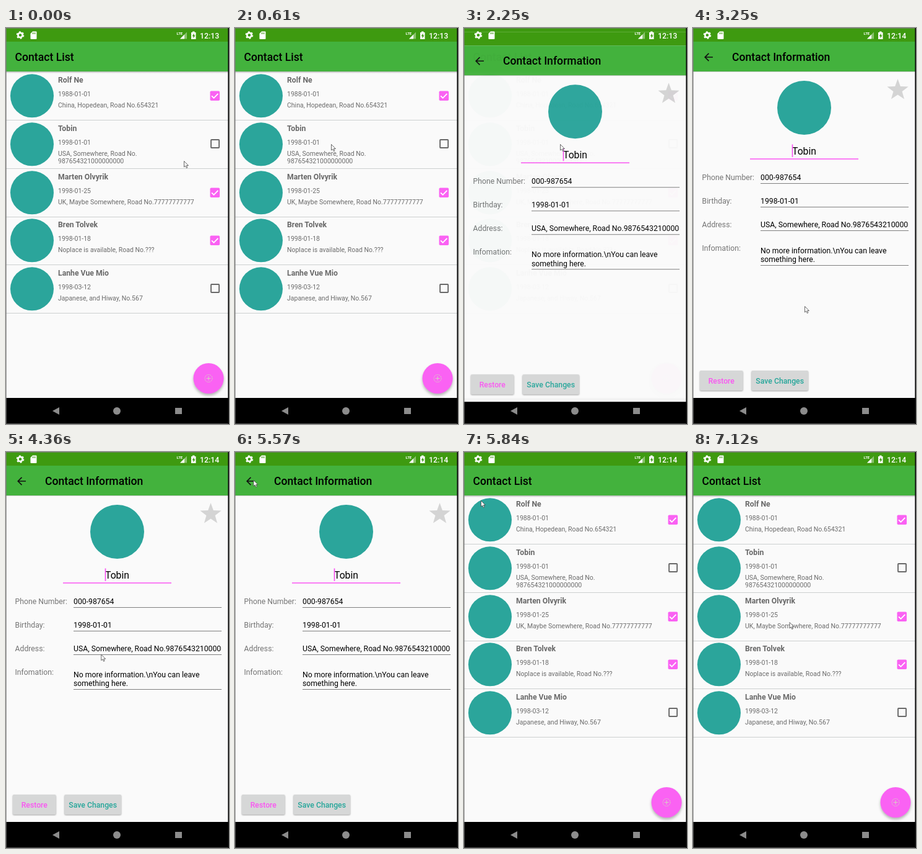
Write an HTML page that moves like this. It is 360x638 px and loops after 8 s.

```html
<!DOCTYPE html>
<html lang="en">
<head>
<meta charset="utf-8">
<title>Contact list</title>
<style>
  html, body { margin: 0; width: 100%; height: 100%; overflow: hidden; background: #000; }
  svg { display: block; width: 360px; height: 638px; font-family: Roboto, sans-serif; font-size: 12.26px; }
  .title { font-size: 17.6px; font-weight: 500; }
  .name { font-weight: 700; fill: #696969; }
  .small { font-size: 10.5px; fill: #6b6b6b; }
  .label { fill: #757575; }
  .btn { font-weight: 500; text-anchor: middle; }
  .shadow { filter: drop-shadow(0 1px 1px rgba(0, 0, 0, .35)); }
  .lift { filter: drop-shadow(0 3px 2px rgba(0, 0, 0, .28)); }
</style>
</head>
<body>
<svg viewBox="0 0 360 638">
  <defs>
    <linearGradient id="fade" x2="0" y2="1">
      <stop stop-color="#000" stop-opacity=".28"/>
      <stop offset="1" stop-color="#000" stop-opacity="0"/>
    </linearGradient>
    <clipPath id="field"><rect x="109" y="300" width="239" height="40"/></clipPath>
    <g id="window">
      <rect width="360" height="638" fill="#fafafa"/>
      <rect width="360" height="22" fill="#3e9a10"/>
      <rect y="22" width="360" height="48" fill="#43b23d"/>
      <rect y="596" width="360" height="42"/>
    </g>
  </defs>

  <g id="list">
    <use href="#window"/>
    <rect y="70" width="360" height="3" fill="url(#fade)"/>
    <text class="title" x="14.5" y="53">Contact List</text>
    <g id="rows"></g>
    <circle class="lift" cx="327" cy="564.5" r="24.5" fill="#fa62f3"/>
    <g fill="none" stroke="#d9cfc4">
      <circle cx="327" cy="564.5" r="6" stroke-dasharray="2 1"/>
      <path d="M323.5 564.5h7M327 561v7"/>
    </g>
  </g>

  <g id="detail">
    <use href="#window"/>
    <rect y="70" width="360" height="1.5" fill="url(#fade)"/>
    <path d="M32 47H19.5M25.5 40.8L19.3 47L25.5 53.2" fill="none" stroke="#111" stroke-width="1.7"/>
    <text class="title" x="63" y="53">Contact Information</text>
    <circle cx="179.5" cy="128.5" r="43.5" fill="#2ba59b"/>
    <polygon id="star" fill="#d4d4d4"/>
    <text x="179.5" y="204" font-size="15.77" text-anchor="middle">Tobin</text>
    <path d="M160.500 187.500v20.500M92 211h175" stroke="#fa55f2" stroke-width="1.7"/>
    <g id="fields"></g>
    <g class="shadow" fill="#d6d7d7">
      <rect x="11" y="552" width="69.5" height="32" rx="1.8"/>
      <rect x="94.5" y="552" width="91.5" height="32" rx="1.8"/>
    </g>
    <text class="btn" x="45.8" y="572.5" fill="#fa55f2">Restore</text>
    <text class="btn" x="140.2" y="572.5" fill="#26a69a">Save Changes</text>
  </g>

  <g id="system" fill="#fff">
    <circle cx="23" cy="11.5" r="3.6" fill="none" stroke="#fff" stroke-width="2.6"/>
    <circle cx="23" cy="11.5" r="5.4" fill="none" stroke="#fff" stroke-width="1.8" stroke-dasharray="2.83"/>
    <path d="M39.5 9L43 5.5h5.500q1 0 1 1v10.500q0 1-1 1h-8q-1 0-1-1z"/>
    <path d="M43 7.300v2.500M45 7.300v2.500M47 7.300v2.500" stroke="#3e9a10"/>
    <path d="M281 17.500L292 6.500v11z" opacity=".4"/>
    <path d="M281 17.500L288 10.500v7z"/>
    <text x="275.5" y="10.5" font-size="6" font-weight="700">LTE</text>
    <path d="M299 7h2V5.500h3.500V7h2v11H299z"/>
    <path d="M303.600 8.500l-3 4.700h1.900v3.300l3-4.800h-1.900z" fill="#3e9a10"/>
    <text id="clock" x="313" y="16.5" font-weight="500">12:13</text>
    <g fill="#8c8c8c">
      <path d="M75 617L86 611v12z"/>
      <circle cx="179" cy="617" r="6"/>
      <rect x="273" y="612" width="11" height="10"/>
    </g>
    <path d="M359 .5H.5V637.500H359" fill="none" stroke="#777" opacity=".7"/>
    <rect x="358.3" width="1.7" height="638" fill="#111"/>
  </g>

  <path id="cursor" d="M0 0V9.500L2.200 7.500L3.800 11L5.400 10.300L3.900 7H6.900Z" fill="#fff" stroke="#444" stroke-width=".8"/>
</svg>
<script>
const $ = id => document.getElementById(id);
const text = (x, y, str, cls = '') => `<text class="${cls}" x="${x}" y="${y}">${str}</text>`;

const contacts = [
  ['Rolf Ne', '1988-01-01', ['China, Hopedean, Road No.654321'], true],
  ['Tobin', '1998-01-01', ['USA, Somewhere, Road No.', '987654321000000000'], false],
  ['Marten Olvyrik', '1998-01-25', ['UK, Maybe Somewhere, Road No.77777777777'], true],
  ['Bren Tolvek', '1998-01-18', ['Noplace is available, Road No.???'], true],
  ['Lanhe Vue Mio', '1998-03-12', ['Japanese, and Hiway, No.567'], false]
];

const box = on => on
  ? `<rect x="329.5" y="101.5" width="15.5" height="15.5" rx="1.8" fill="#fa62f3"/>
     <path d="M332 109.300l3.500 3.500l6.800-7" fill="none" stroke="#fff" stroke-width="1.8"/>`
  : `<rect x="331" y="102" width="13" height="13" rx=".8" fill="none" stroke="#696969" stroke-width="1.9"/>`;

$('rows').innerHTML = contacts.map(([name, date, address, on], i) =>
  `<g transform="translate(0 ${Math.round(i * 77.8)})">
    <circle cx="42" cy="109.3" r="35" fill="#2ba59b"/>
    ${text(84, 88, name, 'name')}${text(84, 110, date, 'small')}
    ${address.map((line, n) => text(84, 128 + n * 12, line, 'small')).join('')}
    ${box(on)}
    <rect y="148" width="360" height="1" fill="#ccd0d0"/>
  </g>`).join('');

const fields = [
  ['Phone Number:', '000-987654'],
  ['Birthday:', '1998-01-01'],
  ['Address:', 'USA, Somewhere, Road No.987654321000000000'],
  ['Infomation:', '']
];
const rule = y => `<rect x="109" y="${y}" width="239" height="1" fill="#808080"/>`;

$('fields').innerHTML = fields.map(([label, value], i) => {
  const y = 245.2 + i * 37.8;
  const clip = i === 2 ? ' clip-path="url(#field)"' : '';
  return text(14.5, y, label, 'label') + `<g${clip}>${text(109, y, value)}</g>` +
    (value ? rule(Math.round(y + 5)) : '');
}).join('') +
  text(109, 363, 'No more information.\\nYou can leave') + text(109, 377.3, 'something here.') + rule(382);

$('star').setAttribute('points', Array.from({ length: 10 }, (_, i) => {
  const r = i % 2 ? 7.4 : 18, a = i * Math.PI / 5;
  return [330.5 + r * Math.sin(a), 100 - r * Math.cos(a)];
}).join(' '));

// Cursor tip: time, x, y
const path = [
  [30, 287.5, 214.5], [500, 163, 182], [610, 155.5, 187.5],
  [2630, 155.5, 187.5], [3250, 180.5, 448.5],
  [3500, 180.5, 448.5], [3740, 75, 300], [3950, 100, 132], [4210, 154.5, 328],
  [4330, 154.5, 328], [5010, 30, 45.5],
  [5600, 30, 45.5], [5840, 27.5, 78.5], [6370, 142, 269.5],
  [6400, 142, 269.5], [6540, 171, 269.5],
  [6820, 171, 269.5], [6910, 162, 292],
  [7060, 162, 292], [7120, 156, 274.5]
];
const clamp = v => Math.min(1, Math.max(0, v));
const smooth = p => p * p * (3 - 2 * p);

function tip(t) {
  const n = path.findIndex(k => k[0] > t);
  if (n < 1) return (n ? path[path.length - 1] : path[0]).slice(1);
  const a = path[n - 1], b = path[n];
  const p = smooth((t - a[0]) / (b[0] - a[0]));
  return [1, 2].map(i => a[i] + (b[i] - a[i]) * p);
}

// Opacity and vertical offset of the detail window
function detailPose(t) {
  if (t < 2170 || t > 5820) return [0, 0];
  if (t < 2330) {
    const d = t - 2170;
    return [1 - .77 * Math.exp(-d / 23), 41 * Math.exp(-d / 43)];
  }
  const p = clamp((t - 5590) / 230);
  return [1 - clamp((p - .4) / .6), 51 * p * p];
}

function draw(now) {
  const t = now % 8000;
  const [alpha, dy] = detailPose(t);
  $('detail').setAttribute('opacity', alpha);
  $('detail').setAttribute('transform', `translate(0 ${dy})`);
  $('cursor').setAttribute('transform', `translate(${tip(t)})`);
  $('clock').textContent = t < 2900 ? '12:13' : '12:14';
}

const start = performance.now();
function frame() {
  draw(performance.now() - start);
  requestAnimationFrame(frame);
}
frame();
</script>
</body>
</html>
```
